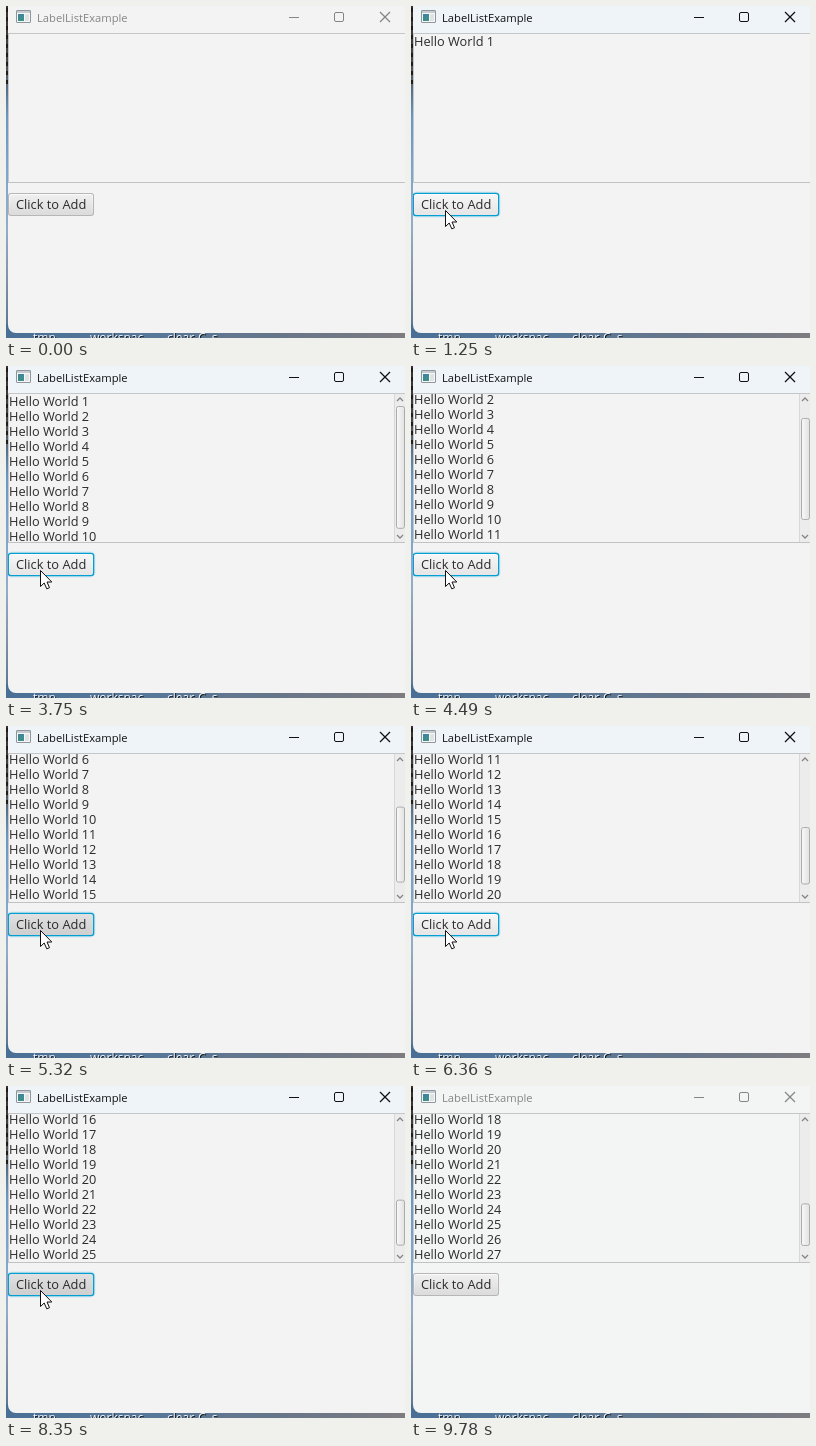
Animation of 399 by 332 pixels, one loop 9.88 s. Source, as an HTML page with a canvas:

```html
<!DOCTYPE html>
<html lang="en">
<head>
<meta charset="utf-8">
<title>LabelListExample</title>
<style>
  html, body { margin: 0; width: 100%; height: 100%; overflow: hidden; background: #f3f3f3; }
  canvas { display: block; width: 399px; height: 332px; }
</style>
</head>
<body>
<canvas id="stage" width="399" height="332"></canvas>
<script>
const ctx = document.getElementById('stage').getContext('2d', { alpha: false });
const LOOP = 9880, ROW = 15, VIEW = 148;
const FOCUS_ON = 1250, FOCUS_OFF = 9780;
const ENTER = 150, ENTER_STEP = 140, LEAVE = 9080, LEAVE_STEP = 130;

// Clicking comes in bursts of even pace. Whole numbers are finished clicks;
// the end of each fraction is the time the button is held.
const pace = [[0, 0], [FOCUS_ON, 1], [1980, 3], [3750, 10], [4180, 10.6],
  [5190, 16], [7290, 26], [8350, 26.6], [8500, 27], [8770, 28]];
const HOLD = 0.59, FIRST_HOLD = 2500;

const mix = (a, b, u) => a + (b - a) * u;

function clicksAt(t) {
  const i = pace.findIndex(([time]) => time > t);
  if (i < 0) return pace.at(-1)[1];
  const [t0, c0] = pace[i - 1], [t1, c1] = pace[i];
  return mix(c0, c1, (t - t0) / (t1 - t0));
}

function pointerAt(t) {
  if (t < ENTER || t >= LEAVE + 3 * LEAVE_STEP) return null;
  if (t >= LEAVE) {
    const u = ((Math.floor((t - LEAVE) / LEAVE_STEP) + 1) / 3) ** 2.5;
    return [mix(34, 326, u), mix(204, 297, u)];
  }
  const left = 1 - Math.min(1, Math.floor((t - ENTER) / ENTER_STEP) / 5);
  const u = 1 - left ** 1.5;
  return [mix(-4, 34, u), mix(219, 204, u)];
}

function gradient(x0, y0, x1, y1, ...colors) {
  const g = ctx.createLinearGradient(x0, y0, x1, y1);
  colors.forEach((c, i) => g.addColorStop(i / (colors.length - 1), c));
  return g;
}

function rect(x, y, w, h, fill) {
  ctx.fillStyle = fill;
  ctx.fillRect(x, y, w, h);
}

function roundRect(x, y, w, h, r, fill, stroke) {
  ctx.beginPath();
  ctx.roundRect(x, y, w, h, r);
  if (fill) { ctx.fillStyle = fill; ctx.fill(); }
  if (stroke) { ctx.strokeStyle = stroke; ctx.lineWidth = 1; ctx.stroke(); }
}

function path(points, stroke, width = 1) {
  ctx.beginPath();
  points.forEach(([x, y]) => ctx.lineTo(x, y));
  ctx.strokeStyle = stroke;
  ctx.lineWidth = width;
  ctx.stroke();
}

function text(str, x, y, size, color) {
  ctx.font = `${size}px "Open Sans", "Noto Sans", sans-serif`;
  ctx.fillStyle = color;
  ctx.fillText(str, x, y);
}

function drawDesktop() {
  rect(0, 0, 3, 332, gradient(0, 0, 0, 332, '#3a2d26', '#46484c', '#6797c4',
    '#7ba6d0', '#94acc8', '#7f90a8', '#52708f'));
  for (let y = 2; y < 75; y += 9) rect(0, y, 2, 4, '#201c1a');
  rect(0, 318, 399, 14, gradient(0, 0, 399, 0, '#4a6f95', '#56789a', '#66758a', '#7d7c80'));
  [['tmp', 27], ['workspac', 84], ['clear-C..s', 161]].forEach(([label, x]) => {
    text(label, x + 1, 337, 12, '#10161c');
    text(label, x, 336, 12, '#f4f6f8');
  });
}

function drawTitleBar(active, base) {
  const ink = active ? '#111' : '#858585';
  rect(2, 0, 397, 27, active ? '#eff4f9' : base);

  roundRect(10.5, 4.5, 14, 12, 0.5, '#f7f7f7', '#8f969b');
  rect(11, 5, 13, 2, '#c5cbd0');
  rect(12, 8, 6, 7, gradient(12, 8, 17, 15, '#3f7f9f', '#3d9486'));
  rect(19, 8, 4, 7, '#dfe3e6');

  text('LabelListExample', 31, 16, 11.2, ink);
  path([[283, 11.5], [293, 11.5]], ink);
  roundRect(328.5, 6.5, 9, 9, 1.5, null, ink);
  path([[374, 6], [384, 16]], ink, 1.2);
  path([[384, 6], [374, 16]], ink, 1.2);
}

function drawScrollBar(count, offset) {
  const top = 39, length = 126.5, total = count * ROW;
  rect(388, 28, 11, 149, '#ececec');
  rect(388, 28, 1, 149, '#d8d8d8');
  path([[391, 35], [394, 32], [397, 35]], '#858585', 1.3);
  path([[391, 169], [394, 172], [397, 169]], '#858585', 1.3);
  roundRect(390.5, top + 1.5 + length * offset / total, 8, length * VIEW / total - 3, 2,
    gradient(390, 0, 399, 0, '#fafafa', '#e0e0e0'), '#ababab');
}

function drawList(count) {
  // The view follows the row before the newest one.
  const offset = Math.max(0, (count - 1) * ROW - VIEW);
  ctx.save();
  ctx.beginPath();
  ctx.rect(3, 28, 396, 149);
  ctx.clip();
  for (let i = Math.floor(offset / ROW); i < count; i++) {
    text(`Hello World ${i + 1}`, 3, 40 + i * ROW - offset, 12.75, '#2b2b2b');
  }
  if (count * ROW > VIEW) drawScrollBar(count, offset);
  ctx.restore();
  rect(2, 27, 397, 1, '#c6c6c6');
  rect(2, 176, 397, 1, '#c2c2c2');
  rect(2, 27, 1, 150, '#c6c6c6');
}

function drawButton(focused, hover, pressed) {
  const [top, bottom] = pressed ? ['#e0e0e0', '#cfcfcf']
    : hover ? ['#f6f6f6', '#e6e6e6'] : ['#efefef', '#dcdcdc'];
  const layer = (inset, r, fill) =>
    roundRect(2 + inset, 187 + inset, 86 - 2 * inset, 23 - 2 * inset, r, fill);
  if (focused) {
    layer(-1.4, 4.4, '#039ed322');
    layer(-0.3, 3.3, '#039ed3');
  } else {
    layer(0, 3, '#b6b6b6');
  }
  layer(1, 2, gradient(0, 188, 0, 209, pressed ? top : '#fbfbfb', bottom));
  layer(2, 1, gradient(0, 189, 0, 208, top, bottom));
  text('Click to Add', 10, 203, 12.85, '#2b2b2b');
}

function drawPointer([x, y]) {
  ctx.save();
  ctx.translate(x + 0.5, y + 0.5);
  ctx.beginPath();
  [[0, 0], [0, 16], [3.7, 12.5], [6.3, 18.4], [9, 17.2], [6.5, 11.5], [11.3, 11.5]]
    .forEach(([px, py]) => ctx.lineTo(px, py));
  ctx.closePath();
  ctx.fillStyle = '#fff';
  ctx.fill();
  ctx.strokeStyle = '#111';
  ctx.lineWidth = 1;
  ctx.stroke();
  ctx.restore();
}

function render(t) {
  const active = t >= FOCUS_ON && t < FOCUS_OFF;
  const base = t >= FOCUS_OFF ? '#f3f5f4' : '#f3f3f3';
  const clicks = clicksAt(t);
  const pressed = t >= FIRST_HOLD && clicks % 1 >= HOLD;
  const hover = t >= ENTER + 3 * ENTER_STEP && t < FOCUS_OFF;
  const pointer = pointerAt(t);

  drawDesktop();
  ctx.save();
  ctx.beginPath();
  ctx.roundRect(2, -6, 420, 333, 8);
  ctx.clip();
  rect(0, 0, 399, 332, base);
  drawTitleBar(active, base);
  drawList(Math.floor(clicks));
  drawButton(active, hover, pressed);
  ctx.restore();
  if (pointer) drawPointer(pointer);
}

const start = performance.now();
function tick() {
  render((performance.now() - start) % LOOP);
  requestAnimationFrame(tick);
}
tick();
</script>
</body>
</html>
```
